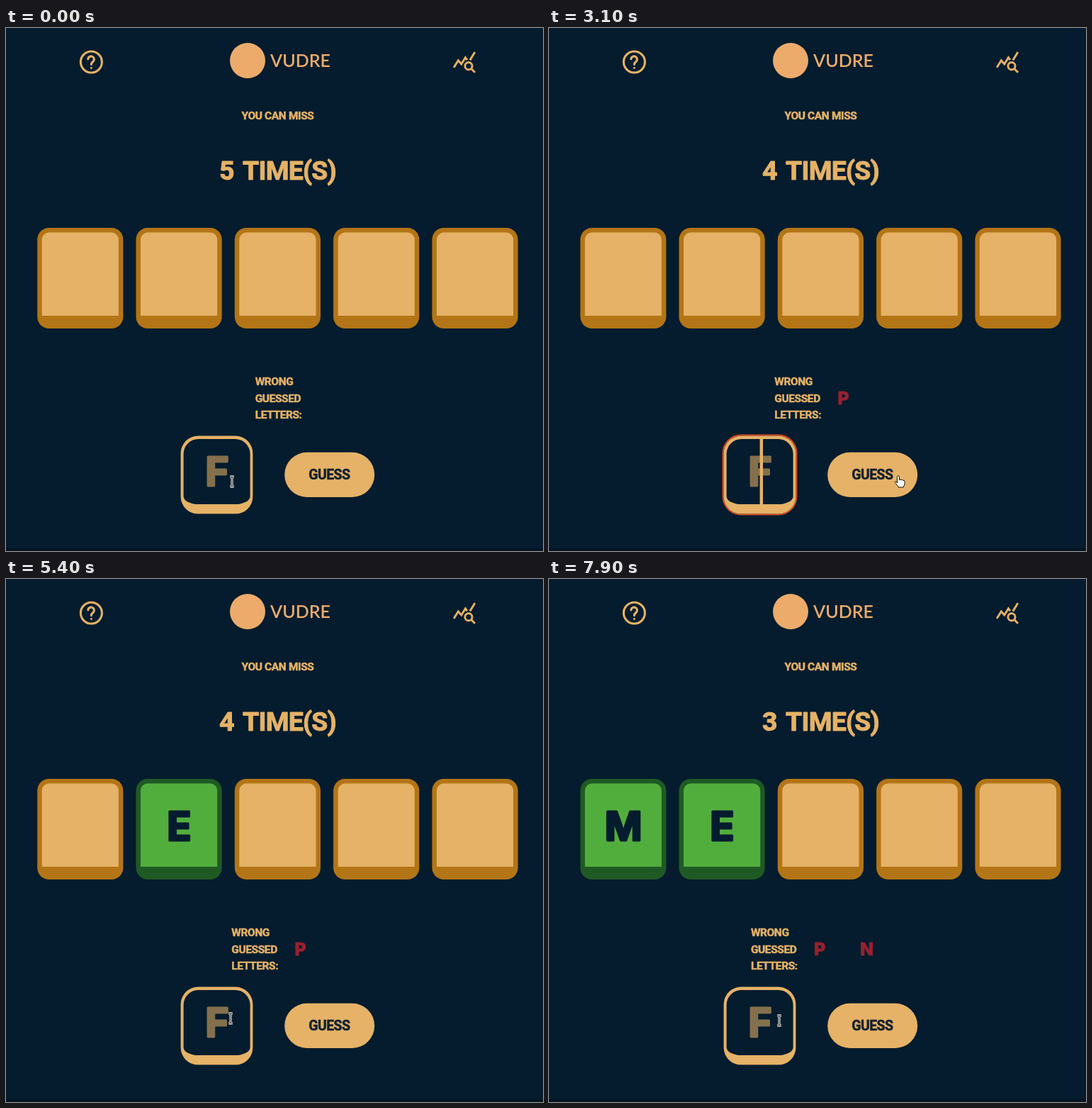
Write an HTML page that moves like this. It is 758 px wide and 738 px high and loops after 8000 ms.

```html
<!DOCTYPE html>
<html lang="en">
<head>
<meta charset="utf-8">
<title>Word guessing game</title>
<style>
  html, body { margin: 0; width: 100%; height: 100%; overflow: hidden; background: #041c2d; }
  svg { display: block; width: 758px; height: 738px; }
  text { font: 700 15.5px Roboto, sans-serif; letter-spacing: -.4px; color: #e5b267;
    fill: currentColor; stroke: currentColor; stroke-width: .5; stroke-linejoin: round; }
  .mid { text-anchor: middle; }
  .misses { font-size: 37.5px; letter-spacing: -.8px; word-spacing: 5px; stroke-width: 1; }
  .guess { font-size: 19.5px; letter-spacing: -.6px; color: #14212d; }
  .brand { font: 600 25px Lato, sans-serif; letter-spacing: 0; color: #ecab6b; stroke: none; }
  .big, .wrong { font-family: Inter, sans-serif; letter-spacing: 0; text-anchor: middle; }
  .big { font-size: 56.5px; stroke-width: 3.2; }
  .wrong { font-size: 24.5px; font-weight: 800; stroke-width: .9; color: #97212f; }
  .line { fill: none; stroke: #e5b267; stroke-linecap: round; }
</style>
</head>
<body>
<svg viewBox="0 0 758 738">
  <rect y="734" width="758" height="4" fill="#031523"/>

  <g transform="translate(120.4 48)" class="line" stroke-width="3.1">
    <circle r="15"/>
    <path d="M-4.6-4.2a4.3 4.3 0 1 1 7.2 3.6C.8 .6 0 1.6 0 3.4M0 8.3v.01"/>
  </g>
  <g transform="translate(629.5 30.2) scale(1.458)" class="line" style="stroke-linecap:butt" stroke-width="2">
    <path d="M1.8 17.5 6.1 10.7 9.1 14.2 13 7.9 14.7 10.3M17.4 10.4 22.2 2.6M18.4 18.4 22.3 22.3"/>
    <circle cx="16.1" cy="16.1" r="3.5"/>
  </g>
  <circle cx="341" cy="46" r="25" fill="#ecab6b"/>
  <text class="brand" x="373" y="55">VUDRE</text>

  <text class="mid" x="383.5" y="129">YOU CAN MISS</text>
  <text class="mid misses" id="misses" x="383.5" y="213.5"></text>

  <g id="tiles"></g>

  <g id="wrongRow">
    <text y="504">WRONG</text>
    <text y="527.7">GUESSED</text>
    <text y="551.3">LETTERS:</text>
    <text class="wrong" x="97.3" y="531"></text>
    <text class="wrong" x="163.8" y="531"></text>
  </g>

  <rect id="ring" x="245.6" y="574.6" width="103.8" height="112" rx="25.5" fill="none" stroke="#dc4a24" stroke-width="2"/>
  <rect x="246.6" y="575.6" width="101.8" height="110" rx="24.5" fill="#e5b267"/>
  <path fill="#041c2d" d="M250.6 601a21 21 0 0 1 21-21h52a21 21 0 0 1 21 21v60a21 11 0 0 1-21 11h-52a21 11 0 0 1-21-11z"/>
  <text class="big" id="typed" x="298" y="646.4"></text>
  <rect id="caret" y="580" width="4.4" height="92" fill="#e5b267"/>

  <rect x="393.2" y="598.8" width="127" height="63.2" rx="31.6" fill="#e5b267"/>
  <text class="mid guess" x="456.3" y="637.2">GUESS</text>

  <g id="cursor">
    <g id="beam" fill="none">
      <path id="bar" d="M-3-7h2l1 1 1-1h2M0-6v12M-3 7h2l1-1 1 1h2" stroke="#fff" stroke-width="3"/>
      <path d="M-3-7h2l1 1 1-1h2M0-6v12M-3 7h2l1-1 1 1h2" stroke="#111"/>
    </g>
    <path id="hand" fill="#fff" stroke="#111" stroke-linejoin="round"
      d="M-3.5 2V-6.5a1.5 1.5 0 0 1 3 0V-2.5q1.5-1 2.6.3 1.4-.9 2.4.5 2.3-.6 2.5 1.2V3q0 2-1.5 4v1H-2v-1L-6.5 1.5q-.6-1.7 1-1.8z"/>
    <path id="arrow" fill="#fff" stroke="#111" d="M-5-8V7l3.4-3.2L.6 8.5l2.4-1L.9 2.9H5.5z"/>
  </g>
</svg>
<script>
  const LOOP = 8000, STEP = 100;
  const ANSWER_DELAY = 100, TRAVEL = 500, REST = 200, CARET_TIME = 1500;
  const LIVES = 5, WORD = 'ME   ';

  // Each round: click the field, type a letter, click the button. The last one is cut off by the loop.
  const rounds = [
    { letter: 'P', focus: 500, type: 1600, submit: 1800, field: [319, 640], button: [497, 648] },
    { letter: 'E', focus: 2600, type: 4300, submit: 4400, field: [312, 632], button: [495, 640] },
    { letter: 'N', focus: 5600, type: 6100, submit: 6600, field: [317, 620], button: [444, 642] },
    { letter: 'M', focus: 7000, type: 7200, submit: 7400, field: [320, 630], button: [478, 629] },
    { focus: 8100, submit: 8500, field: [325, 623] }
  ];

  const $ = id => document.getElementById(id);
  const show = (el, on) => el.setAttribute('visibility', on ? 'visible' : 'hidden');
  const answered = (round, t) => t >= round.submit + ANSWER_DELAY;

  function glide(from, to, k) {
    k = Math.min(1, Math.max(0, k));
    k *= k * (3 - 2 * k);
    return from.map((v, i) => Math.round(v + (to[i] - v) * k));
  }

  function pointerAt(t, round, previous) {
    if (t >= round.focus) return glide(round.field, round.button, (t - round.focus) / TRAVEL);
    if (!previous) return round.field;
    const leave = previous.submit + ANSWER_DELAY;
    return glide(previous.button, round.field, (t - leave) / (round.focus - REST - leave));
  }

  $('tiles').innerHTML = [...WORD].map((_, i) => `<g transform="translate(${44.2 + i * 139.3} 282)">
    <rect width="121.2" height="142" rx="16.5"/>
    <path d="M6.5 124V16.5a10 10 0 0 1 10-10h88.2a10 10 0 0 1 10 10V124z"/>
    <text class="big" x="61" y="87.3" style="color:#041c2d"></text></g>`).join('');
  const tiles = [...$('tiles').children];
  const wrongLetters = document.querySelectorAll('.wrong');

  function drawBoard(t) {
    const guessed = rounds.filter(r => answered(r, t)).map(r => r.letter);
    const wrong = guessed.filter(letter => !WORD.includes(letter));

    $('misses').textContent = `${LIVES - wrong.length} TIME(S)`;
    $('wrongRow').setAttribute('transform', `translate(${351.7 - 33.4 * wrong.length} 0)`);
    wrongLetters.forEach((el, i) => el.textContent = wrong[i] || '');

    tiles.forEach((tile, i) => {
      const hit = guessed.includes(WORD[i]);
      const [edge, face, letter] = tile.children;
      edge.setAttribute('fill', hit ? '#1f5a25' : '#b37516');
      face.setAttribute('fill', hit ? '#52ae3c' : '#e5b267');
      letter.textContent = hit ? WORD[i] : '';
    });
  }

  function drawInput(t, round) {
    const typed = t >= round.type;
    const focused = t >= round.focus && t < round.submit;
    $('typed').textContent = typed ? round.letter : 'F';
    $('typed').style.color = typed ? '#e5b267' : '#85704e';
    show($('ring'), focused);
    show($('caret'), focused && (typed || t < round.focus + CARET_TIME));
    $('caret').setAttribute('x', typed ? 317.6 : 297.6);
  }

  function drawPointer([x, y]) {
    $('cursor').setAttribute('transform', `translate(${x} ${y})`);
    const kind = x < 348 ? 'beam' : x > 393 ? 'hand' : 'arrow';
    for (const id of ['beam', 'hand', 'arrow']) show($(id), id === kind);
  }

  function draw(t) {
    const i = rounds.findIndex(r => !answered(r, t));
    drawBoard(t);
    drawInput(t, rounds[i]);
    drawPointer(pointerAt(t, rounds[i], rounds[i - 1]));
  }

  const start = performance.now();
  function tick() {
    const t = (performance.now() - start) % LOOP;
    draw(Math.floor(t / STEP) * STEP);
    requestAnimationFrame(tick);
  }
  tick();
</script>
</body>
</html>
```
